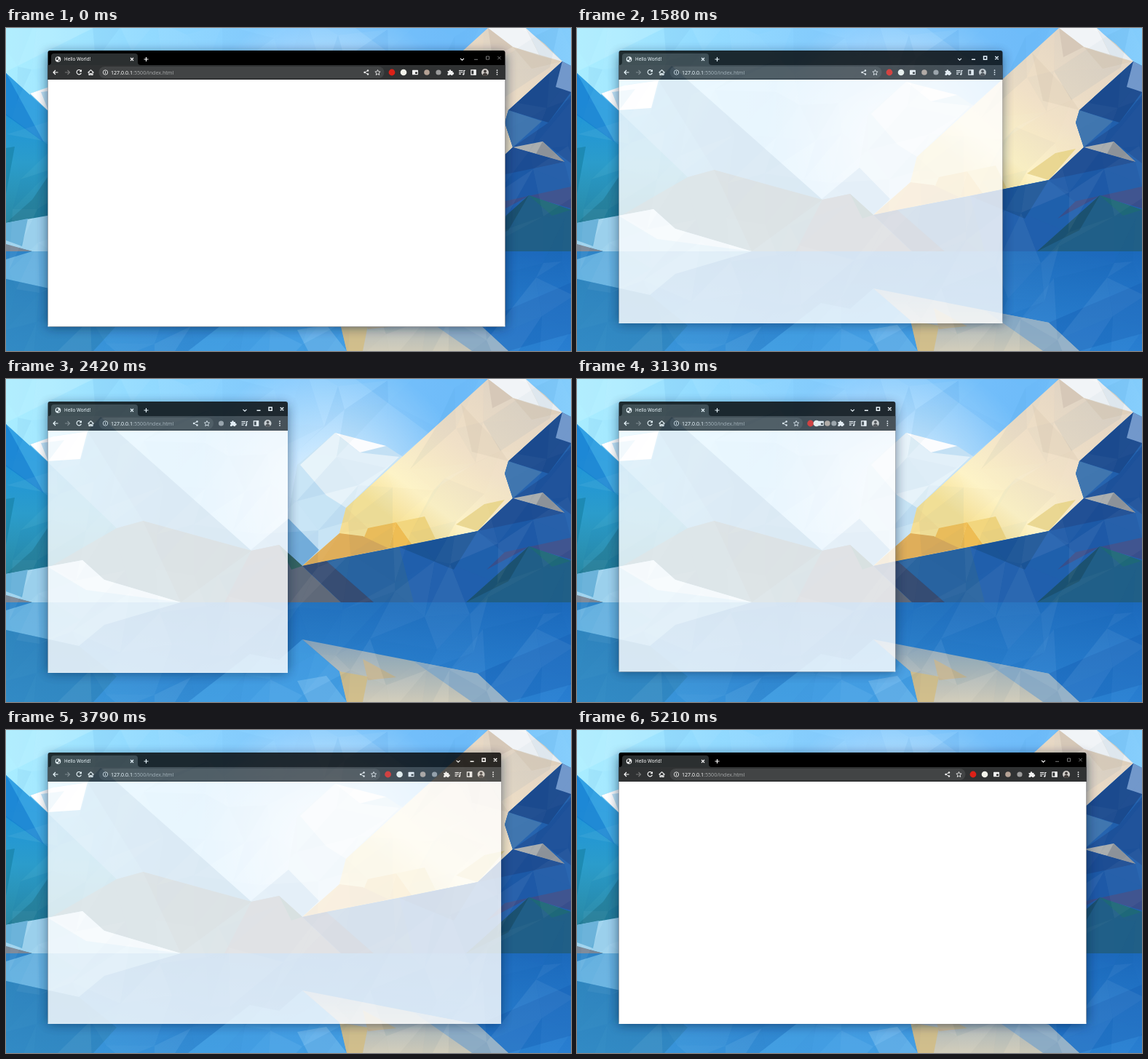
Recreate the animation shown at these times as an HTML page. Size 776 by 444 pixels, loop 5250 ms.

```html
<!DOCTYPE html>
<html lang="en">
<head>
<meta charset="utf-8">
<title>Resizing a browser window</title>
<style>
  html, body { margin: 0; width: 100%; height: 100%; overflow: hidden; background: #2a86d0; }
  svg { display: block; width: 776px; height: 444px; }
  text { font-family: "Noto Sans", sans-serif; fill: #fff; }
  .line { fill: none; stroke: #fff; stroke-width: 1.1; }
  .solid { fill: #f1f1f1; }
</style>
</head>
<body>
<svg viewBox="0 0 776 444">
  <defs>
    <linearGradient id="sky">
      <stop stop-color="#a9edff"/><stop offset=".25" stop-color="#90d9ff"/>
      <stop offset=".5" stop-color="#83cafe"/><stop offset=".8" stop-color="#72bef9"/><stop offset="1" stop-color="#84cdfc"/>
    </linearGradient>
    <radialGradient id="glow" gradientUnits="userSpaceOnUse" cx="445" cy="160" r="190">
      <stop stop-color="#fff" stop-opacity=".85"/><stop offset="1" stop-color="#fff" stop-opacity="0"/>
    </radialGradient>
    <linearGradient id="slope" gradientUnits="userSpaceOnUse" x1="60" y1="90" x2="270" y2="210">
      <stop stop-color="#58b9ea"/><stop offset="1" stop-color="#4a97cf"/>
    </linearGradient>
    <linearGradient id="west" x2="0" y2="1">
      <stop stop-color="#168fe2"/><stop offset=".5" stop-color="#2b9dcb"/><stop offset="1" stop-color="#287f92"/>
    </linearGradient>
    <linearGradient id="snow" x2="0" y2="1">
      <stop stop-color="#eef7fd"/><stop offset="1" stop-color="#a5d3ef"/>
    </linearGradient>
    <linearGradient id="sunlit" gradientUnits="userSpaceOnUse" x1="710" y1="20" x2="560" y2="215">
      <stop stop-color="#e3d5c4"/><stop offset=".45" stop-color="#f0e0c6"/>
      <stop offset=".8" stop-color="#fdf2c4"/><stop offset="1" stop-color="#f7e296"/>
    </linearGradient>
    <linearGradient id="lake">
      <stop stop-color="#3a9bd8"/><stop offset=".35" stop-color="#2c83cb"/><stop offset="1" stop-color="#1c70c6"/>
    </linearGradient>
    <linearGradient id="depth" x2="0" y2="1">
      <stop stop-color="#1a5ca8" stop-opacity=".35"/><stop offset="1" stop-color="#48a6f0" stop-opacity=".3"/>
    </linearGradient>
    <linearGradient id="mirror" x2="0" y2="1">
      <stop stop-color="#86a3ba"/><stop offset="1" stop-color="#d0cbb8"/>
    </linearGradient>
    <filter id="blur" x="-20%" y="-20%" width="140%" height="140%"><feGaussianBlur stdDeviation="8"/></filter>
  </defs>

  <g id="wallpaper">
    <path fill="url(#sky)" d="M0 0H776V307H0z"/>
    <path fill="url(#glow)" d="M0 0H776V307H0z"/>
    <path fill="#c9f3ff" opacity=".3" d="M0 0H120L0 60z"/>
    <path fill="#5fb4f5" opacity=".25" d="M480 0H662L580 74z"/>

    <!-- distant peaks -->
    <path fill="#c6e3f5" d="M400 118L452 74L522 92L545 107L467 177L458 212L407 257L380 230z"/>
    <path fill="#fff" d="M452 74L522 92L486 101z"/>
    <path fill="#e6f3fa" d="M404 118L452 74L486 101L540 107L467 177L440 160z"/>
    <path fill="#78b1dd" d="M335 236L388 192L430 235L407 257z"/>

    <!-- western mountain -->
    <path fill="url(#slope)" d="M33 90L70 78L112 72L130 52L337 236L300 307H57z"/>
    <path fill="#3f8dc6" opacity=".5" d="M130 52L337 236L188 195L112 72z"/>
    <path fill="#fff" d="M33 90L65 79L112 72L102 110L57 113z"/>
    <path fill="#bfe3f7" d="M48 88L80 84L58 113z"/>
    <path fill="url(#west)" d="M0 62L57 114L152 205L200 307H0z"/>
    <path fill="#45aee8" opacity=".55" d="M0 118L57 160V114L0 62z"/>
    <path fill="#0f78cf" opacity=".6" d="M0 62L52 157L0 120z"/>
    <path fill="#147b9f" opacity=".55" d="M0 165L12 163L0 228z"/>
    <path fill="#1e718d" opacity=".55" d="M36 236L57 205V258L0 268z"/>
    <path fill="#4e7c8c" d="M57 260L152 205L188 195L337 236L375 228L407 257L460 307H57z"/>
    <path fill="#476a78" d="M188 195L337 236L240 307z"/>
    <path fill="#5e6878" d="M337 236L375 228L407 257L460 307H300z"/>
    <path fill="#35645f" d="M375 228L407 257L392 262z"/>
    <path fill="#9fd3ee" d="M0 268L57 258L105 249L135 276L240 307H36L0 298z"/>
    <path fill="#d4eaf7" d="M57 258L105 249L135 276L240 307L110 290z"/>
    <path fill="#65b0d8" d="M0 268L30 262L22 300L0 292z"/>
    <path fill="#7a8796" d="M0 297L36 307H0z"/>

    <!-- sunlit mountain -->
    <path fill="url(#sunlit)" d="M662 0H712L740 22L764 46L690 113L685 130L696 164L648 209L407 257L458 212L467 177z"/>
    <path fill="#f5f7f8" d="M662 0H714L733 38L696 26z"/>
    <path fill="#e9eef2" d="M714 0L764 46L733 38z"/>
    <path fill="#d9cab8" d="M662 0L696 26L668 40z"/>
    <path fill="#dccbb6" opacity=".6" d="M696 26L764 46L722 56z"/>
    <path fill="#e0cfb7" opacity=".5" d="M625 34L668 80L690 113L640 100z"/>
    <path fill="#f4dd92" d="M467 177L497 205L458 212z"/>
    <path fill="#f2c158" d="M497 205L536 197L526 233L490 222z"/>
    <path fill="#eebb4f" d="M536 197L558 228L526 233z"/>
    <path fill="#f2d67d" d="M536 197L575 189L590 220L558 228z"/>
    <path fill="#dfad58" d="M407 257L458 212L490 216L526 233z"/>
    <path fill="#e9d58d" d="M657 172L685 166L648 209L618 200z"/>

    <!-- eastern mountain -->
    <path fill="#2160ad" d="M764 46L776 52V307H460L407 257L648 209L696 164L685 130L690 113z"/>
    <path fill="#1b4a8e" d="M764 46L776 88L745 130L690 113z"/>
    <path fill="#6f96ca" d="M764 46L776 52V88L755 81z"/>
    <path fill="#3b73ad" d="M690 113L736 128L696 164L685 130z"/>
    <path fill="#1d519a" d="M745 130L776 92V186L737 156L696 164z"/>
    <path fill="#a9adae" d="M696 164L737 156L767 184z"/>
    <path fill="#8c9299" d="M737 156L767 184L728 173z"/>
    <path fill="#1d4d93" d="M696 164L767 184L700 200L648 209z"/>
    <path fill="#1e5aa7" d="M648 209L767 184L776 218L685 240z"/>
    <path fill="#29649f" d="M440 250L540 231L560 307H505z"/>
    <path fill="#1b5496" d="M540 231L648 209L615 262z"/>
    <path fill="#364c72" d="M407 257L440 250L505 307H460z"/>
    <path fill="#394f8c" d="M776 218V248L718 231L660 262L685 238z"/>
    <path fill="#205f87" d="M718 230L776 250V307H632z"/>
    <path fill="#1b5270" d="M718 230L690 278L632 307z"/>
    <path fill="#1e6878" d="M718 230L776 250L750 258z"/>

    <!-- lake and reflections -->
    <path fill="url(#lake)" d="M0 307H776V444H0z"/>
    <path fill="url(#depth)" d="M0 307H776V444H0z"/>
    <path fill="#7cc3ea" opacity=".7" d="M0 318L36 307H240L135 338L100 367L0 345z"/>
    <path fill="#2a7fae" opacity=".5" d="M0 345L100 367L152 409L120 444H0z"/>
    <path fill="#55b2f3" opacity=".55" d="M250 444L335 378L375 386L407 358L458 402L468 444z"/>
    <path fill="#82c4f2" opacity=".5" d="M400 415L440 408L468 444H415z"/>
    <path fill="url(#mirror)" d="M407 358L648 405L690 444H468L458 402z"/>
    <path fill="#d3ba7c" opacity=".75" d="M458 402L497 409L490 444H468z"/>
    <path fill="#c8b389" opacity=".8" d="M490 385L536 410L497 414z"/>
    <path fill="#84a9c8" opacity=".8" d="M560 388L648 405L690 444H640z"/>
    <path fill="#175fb4" opacity=".4" d="M648 405L776 350V420L690 444z"/>
    <g id="facets"></g>
  </g>

  <g id="window">
    <rect id="shadow" x="57.5" y="35" fill="#001a3c" opacity=".65" filter="url(#blur)"/>
    <rect id="frame" x="57.5" y="31" rx="3"/>
    <rect id="page" x="57.5" y="71" fill="#fff"/>
    <rect id="toolbar" x="57.5" y="51" height="20" fill="#303233"/>
    <path fill="#2b2f30" d="M58 51q4 0 4-4V39q0-4 4-4H177q4 0 4 4v8q0 4 4 4z"/>
    <circle cx="71.5" cy="43" r="3.8" class="solid"/>
    <path fill="#3a3e3f" d="M69 41l2-1 1 2-1 2-2 0zM72 44l2-1 0 2-2 1z"/>
    <text x="80" y="45.4" font-size="6.3">Hello World!</text>
    <path class="line" d="M171 41l4 4m0-4l-4 4M189.500 43h6m-3-3v6"/>
    <path class="line" d="M71.500 61h-6.500m3-3l-3 3l3 3"/>
    <path class="line" style="stroke:#777" d="M81 61h6.500m-3-3l3 3l-3 3"/>
    <path class="line" d="M103 59a3.200 3.200 0 1 0 .3 2.800M103.400 57.500v2.300h-2.400"/>
    <path class="line" d="M112.500 61.300l4-3.600l4 3.600M114 60.500v4h1.700v-2h1.600v2h1.700v-4"/>
    <rect id="omnibox" x="127.500" y="53" height="16" rx="8" fill="#424445"/>
    <circle class="line" cx="136.500" cy="61" r="3.200" style="stroke-width:.8"/>
    <path class="line" style="stroke-width:.9" d="M136.500 60.500v2.200M136.500 59v.8"/>
    <text x="144" y="63.500" font-size="7.1">127.0.0.1<tspan fill="#a2a4a5">:5500/index.html</tspan></text>

    <g id="actions">
      <path class="line" style="stroke-width:.8" d="M-22.500 58.500L-27 61l4.500 2.500"/>
      <g class="solid"><circle cx="-22.500" cy="58.500" r="1.200"/><circle cx="-27" cy="61" r="1.200"/><circle cx="-22.500" cy="63.500" r="1.200"/></g>
      <path class="line" style="stroke-width:.8" d="M-9 57.500l1 2.300l2.600.3l-1.900 1.800l.5 2.600l-2.200-1.300l-2.200 1.300l.5-2.600l-1.900-1.800l2.600-.3z"/>
    </g>

    <g id="edge">
      <path class="line" d="M-61.500 41.800l2.500 2.400l2.500-2.400"/>
      <g id="buttons" fill="none">
        <path d="M-42.500 43.300h5M-26 39h4.200v4.200h-4.200zM-10.200 38.900l4.400 4.400m0-4.400l-4.400 4.400"/>
      </g>
      <g class="extension"><circle cy="61" r="4.400" fill="#dc2118"/></g>
      <g class="extension"><circle cy="61" r="4.300" fill="#f2f2ea"/></g>
      <g class="extension"><rect class="solid" x="-4" y="57.800" width="8" height="6.500" rx=".6"/><path fill="#333" d="M0 60.500h3v2.500h-3z"/></g>
      <g class="extension"><circle cy="61" r="3.800" fill="#b5a295"/></g>
      <g class="extension"><circle cy="61" r="3.600" fill="#9b9b9b"/></g>
      <path class="solid" d="M-79 59h2.200a1.300 1.300 0 1 1 2.500 0h2.300v2.200a1.300 1.300 0 1 1 0 2.500v1.300h-2.200a1.300 1.300 0 0 0-2.500 0h-2.300v-2.200a1.300 1.300 0 0 0 0-2.500z"/>
      <path class="line" d="M-63.500 58.500h5.500m-5.500 2.300h5.500m-5.500 2.300h3M-56.500 63.500v-5h1.600"/>
      <circle class="solid" cx="-57.300" cy="63.600" r="1.200"/>
      <path class="line" d="M-46.700 57.900h6.400v6.200h-6.400z"/>
      <path class="solid" d="M-43.300 57.500h3v7h-3z"/>
      <circle cx="-27.500" cy="61" r="5" fill="#d0ccc8"/>
      <path fill="#413c3a" d="M-30.800 64.700q.4-3 3.300-3t3.300 3q-3.300 2.600-6.600 0z"/>
      <circle cx="-27.500" cy="59.500" r="1.900" fill="#413c3a"/>
      <g class="solid"><circle cx="-11" cy="58.200" r=".9"/><circle cx="-11" cy="61" r=".9"/><circle cx="-11" cy="63.800" r=".9"/></g>
    </g>
  </g>
</svg>
<script>
const LOOP = 5250, LEFT = 57.5, TOP = 31;
const $ = id => document.getElementById(id);
const extensions = [...document.querySelectorAll('.extension')];

// Each track is a list of [time, value] pairs joined by straight lines.
const rightTrack = [[1210, 685.5], [1330, 675], [1450, 642], [1580, 585], [1710, 524], [1850, 452],
  [2000, 389.5], [2210, 387], [2790, 387], [2960, 400], [3130, 437], [3290, 502], [3380, 548],
  [3580, 634], [3790, 680], [3880, 685.5], [3920, 692], [3960, 699.5]];
const bottomTrack = [[1210, 410.5], [1580, 406], [2000, 409.5], [2210, 407], [2290, 406], [2420, 404],
  [2790, 404], [3130, 402.5], [3790, 404]];
const opacityTrack = [[1209, 1], [1210, .89], [1370, .81], [4100, .81], [4130, .85], [4290, 1]];
const extensionTrack = [[1840, 80], [1990, 32], [2270, 32], [2420, 16], [2980, 16], [3080, 32], [3130, 41], [3270, 80]];

function valueAt(track, t) {
  const i = track.findIndex(key => key[0] > t);
  if (i < 0) return track[track.length - 1][1];
  if (i === 0) return track[0][1];
  const [t0, a] = track[i - 1], [t1, b] = track[i];
  return a + (b - a) * (t - t0) / (t1 - t0);
}

function set(id, attributes) {
  for (const name in attributes) $(id).setAttribute(name, attributes[name]);
}

// A faint jittered triangle mesh gives the wallpaper its low-poly texture.
function drawFacets() {
  let seed = 11;
  const random = () => (seed = seed * 16807 % 2147483647) / 2147483647;
  const size = 52, columns = 16, rows = 10;
  const points = Array.from({ length: rows * columns }, (_, i) => [
    (i % columns + random() * .8 - .4) * size,
    (Math.floor(i / columns) + random() * .8 - .4) * size
  ].map(Math.round));
  let markup = '';
  const triangle = (...corners) => {
    const shade = random() < .5 ? '#fff' : '#0a4f9c';
    markup += `<polygon points="${corners.map(c => points[c]).join(' ')}" fill="${shade}" opacity="${random() * .06}"/>`;
  };
  for (let row = 0; row < rows - 1; row++) {
    for (let column = 0; column < columns - 1; column++) {
      const a = row * columns + column, b = a + columns;
      triangle(a, a + 1, b);
      triangle(a + 1, b + 1, b);
    }
  }
  $('facets').innerHTML = markup;
}

function placeExtensions(space) {
  const settled = space <= 32;
  const step = settled ? 16 : Math.max(9, space / 5);
  extensions.forEach((icon, i) => {
    const slot = extensions.length - i;
    const offset = settled || space >= 79 ? slot * step : Math.min(slot * step, Math.max(space - 10, slot * space / 5));
    icon.setAttribute('transform', `translate(${-75.5 - offset})`);
    icon.setAttribute('visibility', settled && slot * 16 > space + 8 ? 'hidden' : 'visible');
  });
}

function draw() {
  const t = performance.now() % LOOP;
  const right = valueAt(rightTrack, t), bottom = valueAt(bottomTrack, t);
  const space = valueAt(extensionTrack, t);
  const width = right - LEFT, omniboxEnd = right - 86 - space;
  const active = t >= 1210 && t < 5210;

  set('window', { opacity: valueAt(opacityTrack, t) });
  set('shadow', { width, height: bottom - 35 });
  set('frame', { width, height: bottom - TOP });
  set('page', { width, height: bottom - 71 });
  set('toolbar', { width });
  set('omnibox', { width: omniboxEnd - 127.5 });
  set('actions', { transform: `translate(${omniboxEnd})` });
  set('edge', { transform: `translate(${right})` });
  set('buttons', { stroke: active ? '#fff' : '#858585', 'stroke-width': active ? 1.4 : .9 });
  placeExtensions(space);
  requestAnimationFrame(draw);
}

drawFacets();
draw();
</script>
</body>
</html>
```
